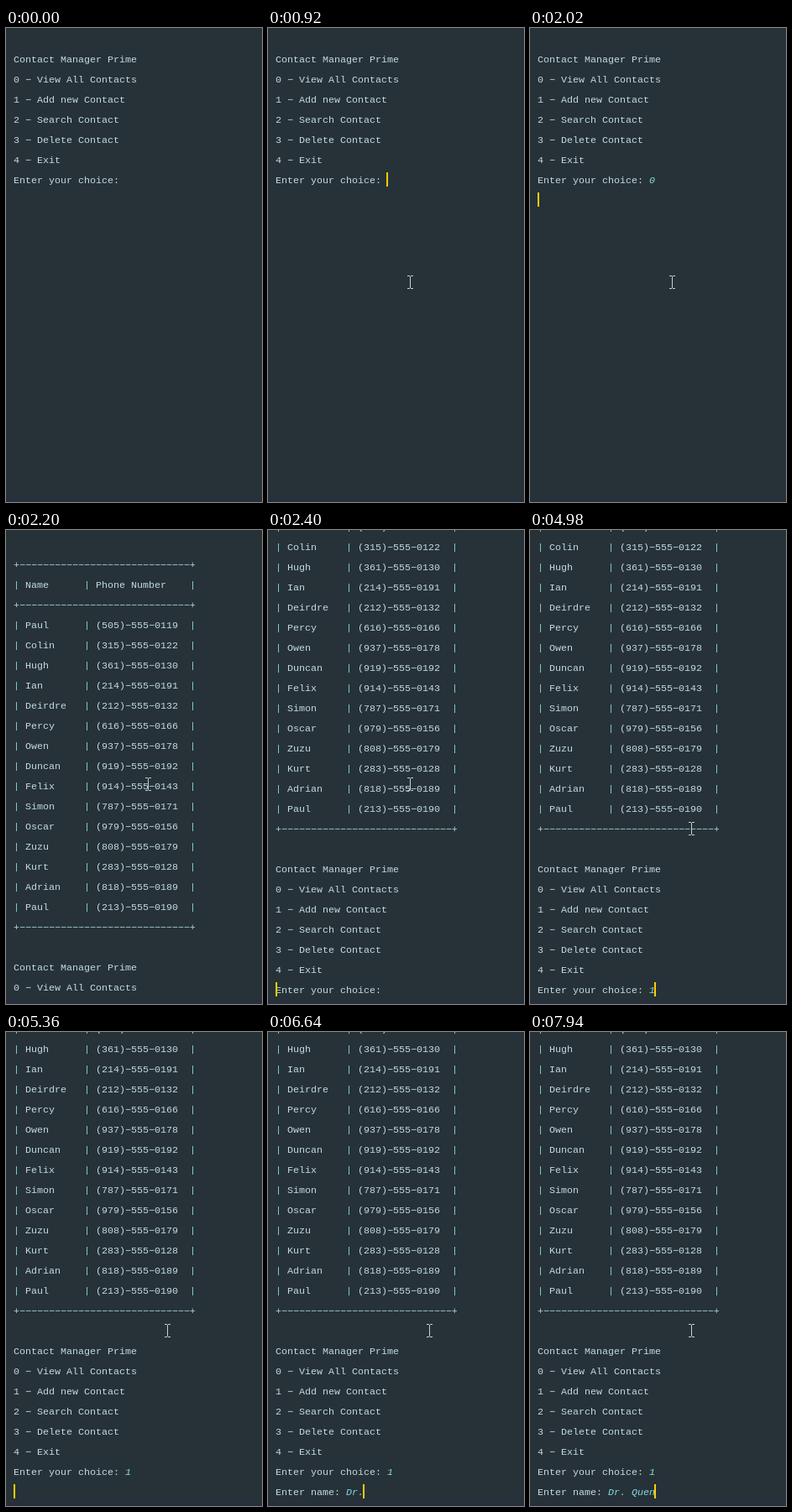
An HTML page that plays this animation: 305x565 px, repeating every 8000 ms.

```html
<!DOCTYPE html>
<html lang="en">
<head>
<meta charset="utf-8">
<title>Contact manager console</title>
<style>
  html, body { margin: 0; width: 100%; height: 100%; overflow: hidden; background: #263238; }
  svg { display: block; }
  text {
    font: 11.667px "Liberation Mono", "Courier New", monospace;
    white-space: pre;
    fill: #c5dae2;
  }
  .rule { fill: #b0d6d6; }
  .bar { fill: #86cfc9; }
  .input { font-style: italic; fill: #84dcc8; }
  .name { font-style: italic; fill: #84d8e4; }
</style>
</head>
<body>
<svg id="stage" width="305" height="565" viewBox="0 0 305 565">
  <rect width="305" height="565" fill="#263238"/>
  <g id="lines"></g>
  <rect y="560" width="305" height="5" fill="#272f3d"/>
  <rect id="caret" width="2" height="17" fill="#ffcc00" shape-rendering="crispEdges"/>
  <path id="mouse" d="M0 .5h3M4 .5h3M3.5 1v14M0 15.5h3M4 15.5h3" fill="none" stroke="#c8d0d3" shape-rendering="crispEdges"/>
</svg>
<script>
const DURATION = 8000, LEFT = 9, CHAR = 7, LINE = 24, CARET_RISE = 13;
const DASH = "\u2212"; // as wide as a typewriter hyphen
const $ = id => document.getElementById(id);

const menu = [
  "Contact Manager Prime", `0 ${DASH} View All Contacts`, `1 ${DASH} Add new Contact`,
  `2 ${DASH} Search Contact`, `3 ${DASH} Delete Contact`, `4 ${DASH} Exit`, "Enter your choice: "
];
const contacts = [
  ["Paul", "505", 119], ["Colin", "315", 122], ["Hugh", "361", 130],
  ["Ian", "214", 191], ["Deirdre", "212", 132], ["Percy", "616", 166],
  ["Owen", "937", 178], ["Duncan", "919", 192], ["Felix", "914", 143],
  ["Simon", "787", 171], ["Oscar", "979", 156], ["Zuzu", "808", 179],
  ["Kurt", "283", 128], ["Adrian", "818", 189], ["Paul", "213", 190]
];

const span = (text, kind) => `<tspan class="${kind}">${text}</tspan>`;
const bar = span("|", "bar");
const rule = span("+" + DASH.repeat(29) + "+", "rule");
const row = (name, phone) => `${bar} ${name.padEnd(10)}${bar} ${phone.padEnd(16)}${bar}`;

const table = [
  rule, row("Name", "Phone Number"), rule,
  ...contacts.map(([name, area, n]) => row(name, `(${area})${DASH}555${DASH}0${n}`)),
  rule
];
const content = [...menu, "", ...table, "", ...menu, ""];
const FIRST = menu.length - 1, LAST = content.length - 1, SECOND = LAST - 1;

const lines = content.map((html, i) => {
  const el = document.createElementNS("http://www.w3.org/2000/svg", "text");
  el.setAttribute("x", LEFT);
  el.setAttribute("y", i * LINE);
  el.innerHTML = html;
  return $("lines").appendChild(el);
});

// Each step: start time, then the values held until the next step.
const scroll = [[0, 41], [2200, -147], [2400, -264], [5360, -288]];
const mouse = [[0, null], [360, 127, 304], [540, 166, 295], [3880, 171, 301], [4060, 190, 354], [4240, 189, 348]];
const caret = [
  [0, null], [920, FIRST, 19], [1660, FIRST, 20], [2020, FIRST + 1, 0], [2200, null],
  [2400, SECOND, 0], [2760, null], [3320, SECOND, 0], [3880, null], [4240, SECOND, 0],
  [4800, null], [4980, SECOND, 20], [5360, LAST, 0], [5540, LAST, 12]
];
const typed = "Dr. Quen";
const keys = [6280, 6460, 6640, 7020, 7380, 7580, 7760, 7940];

const at = (steps, t) => steps.filter(s => s[0] <= t).pop().slice(1);

function place(el, x, y) {
  el.setAttribute("visibility", x === null ? "hidden" : "visible");
  if (x !== null) el.setAttribute("transform", `translate(${x} ${y})`);
}

function draw(t) {
  const [top] = at(scroll, t);
  const count = keys.filter(k => k <= t).length;
  place($("lines"), 0, top);
  lines.forEach((el, i) => {
    el.style.display = i > FIRST && t < 2200 ? "none" : "";
  });
  lines[FIRST].innerHTML = content[FIRST] + (t >= 1660 ? span("0", "input") : "");
  lines[SECOND].innerHTML = content[SECOND] + (t >= 4980 ? span("1", "input") : "");
  lines[LAST].innerHTML = t >= 5540 ? "Enter name: " + span(typed.slice(0, count), "name") : "";

  const [line, col] = at(caret, t);
  if (line === null) place($("caret"), null);
  else {
    const x = Math.max(LEFT, LEFT - 1 + (col + count) * CHAR);
    place($("caret"), x, top + line * LINE - CARET_RISE);
  }
  place($("mouse"), ...at(mouse, t));
}

const start = performance.now();
function tick() {
  draw((performance.now() - start) % DURATION);
  requestAnimationFrame(tick);
}
tick();
</script>
</body>
</html>
```
